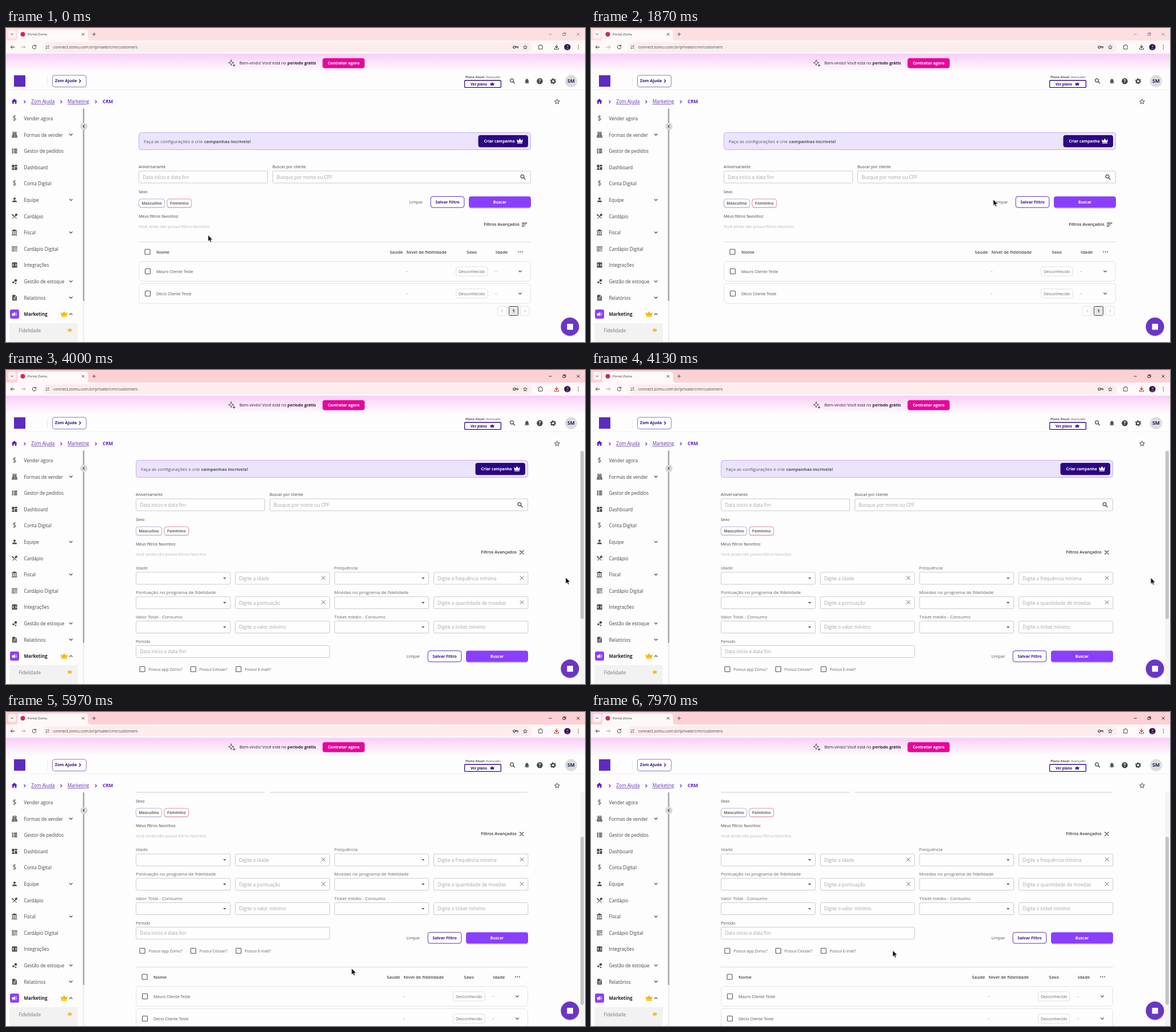
Write an HTML page that moves like this. It is 1017 by 551 pixels and loops after 8 s.

```html
<!DOCTYPE html>
<html lang="pt-BR">
<head>
<meta charset="utf-8">
<title>Portal Zomu</title>
<style>
html, body { margin: 0; width: 100%; height: 100%; overflow: hidden; background: #fdfdfd; }
svg { display: block; width: 1017px; height: 551px; }
text { font-family: "Open Sans", "Noto Sans", sans-serif; white-space: pre; }
.line { fill: none; stroke-linecap: round; stroke-linejoin: round; }

#strip, #wins, #save, #shut, #open, #hover, #arrow, #hand { animation: 8s step-end infinite; }
#strip { fill: #fddfe2; animation-name: strip; }
#wins { stroke: #8d8486; animation-name: wins; }
#save { stroke: #3c3c3c; animation-name: save; }
#shut { animation-name: shut; }
#open { visibility: hidden; animation-name: open; }
#hover { visibility: hidden; animation-name: hover; }
#arrow { animation-name: arrow; }
#hand { visibility: hidden; animation-name: hover; }
#page { animation: scroll 8s linear infinite; }
#thumb { animation: thumb 8s linear infinite; }
#cursor { animation: move 8s ease-in-out infinite; }

@keyframes strip { 38% { fill: #fcd1d6; } }
@keyframes wins { 38% { stroke: #222; } }
@keyframes save { 38% { stroke: #c5221f; } }
@keyframes shut { 0% { visibility: visible; } 38% { visibility: hidden; } }
@keyframes open { 0% { visibility: hidden; } 38% { visibility: visible; } }
@keyframes hover { 0% { visibility: hidden; } 30% { visibility: visible; } 38% { visibility: hidden; } }
@keyframes arrow { 0% { visibility: visible; } 30% { visibility: hidden; } 38% { visibility: visible; } }
@keyframes scroll {
  0%, 52.4% { transform: translateY(0); animation-timing-function: ease-in-out; }
  55.4%, 100% { transform: translateY(-106px); }
}
@keyframes thumb {
  0%, 52.4% { transform: translateY(0); animation-timing-function: ease-in-out; }
  55.4%, 100% { transform: translateY(77px); }
}
@keyframes move {
  0%, .4% { transform: translate(355px, 363.5px); }
  10%, 12.5% { transform: translate(340px, 249.5px); animation-timing-function: ease-in; }
  21% { transform: translate(590px, 276px); animation-timing-function: ease-out; }
  31%, 38.5% { transform: translate(911.5px, 344.5px); }
  48%, 51% { transform: translate(983px, 364px); }
  55%, 62.5% { transform: translate(985.5px, 376px); animation-timing-function: ease-in; }
  72.9% { transform: translate(655px, 428px); animation-timing-function: ease-out; }
  74.6%, 77% { transform: translate(607px, 450px); }
  90%, 100% { transform: translate(530px, 418.5px); }
}
</style>
</head>
<body>
<svg id="stage" viewBox="0 0 1017 551" xmlns="http://www.w3.org/2000/svg"></svg>
<script>
const text = (x, y, s, size = 7, fill = '#444', weight = 400, more = '') =>
  `<text x="${x}" y="${y}" font-size="${size}" fill="${fill}" font-weight="${weight}" ${more}>${s}</text>`;
const box = (x, y, w, h, fill = 'none', stroke = 'none', r = 2, more = '') =>
  `<rect x="${x}" y="${y}" width="${w}" height="${h}" rx="${r}" fill="${fill}" stroke="${stroke}" ${more}/>`;
const dot = (x, y, r, fill) => `<circle cx="${x}" cy="${y}" r="${r}" fill="${fill}"/>`;
const line = (d, stroke = '#444', w = 1) => `<path class="line" d="${d}" stroke="${stroke}" stroke-width="${w}"/>`;
// filled icon on a 24 unit grid, centred at x, y
const icon = (d, x, y, size, fill = '#4a4a4a') =>
  `<path fill-rule="evenodd" fill="${fill}" d="${d}" transform="translate(${x - size / 2} ${y - size / 2}) scale(${size / 24})"/>`;
const chevron = (x, y, dir, c = '#444', s = 2.4, w = 1.2) => line({
  down: `M${x - s} ${y - s / 2}l${s} ${s} ${s} ${-s}`,
  up: `M${x - s} ${y + s / 2}l${s} ${-s} ${s} ${s}`,
  right: `M${x - s / 2} ${y - s}l${s} ${s} ${-s} ${s}`,
  left: `M${x + s / 2} ${y - s}l${-s} ${s} ${s} ${s}`
}[dir], c, w);
const cross = (x, y, s, c = '#444', w = 1) =>
  line(`M${x - s} ${y - s}l${2 * s} ${2 * s}M${x + s} ${y - s}l${-2 * s} ${2 * s}`, c, w);

const paths = {
  list: 'M3 4h5v4H3zM10 4h11v4H10zM3 10h5v4H3zM10 10h11v4H10zM3 16h5v4H3zM10 16h11v4H10z',
  dash: 'M3 13h8V3H3v10zm0 8h8v-6H3v6zm10 0h8V11h-8v10zm0-18v6h8V3h-8z',
  person: 'M12 12c2.2 0 4-1.8 4-4s-1.8-4-4-4-4 1.8-4 4 1.8 4 4 4zm0 2c-2.7 0-8 1.3-8 4v2h16v-2c0-2.7-5.3-4-8-4z',
  till: 'M5 2h14v7H5zM7 4v2h10V4zM6 10h12l4 8H2zM8 12v1h8v-1zM7 15v1h10v-1zM2 19h20v3H2z',
  fork: 'M8.1 13.3l2.8-2.8L3.9 3.5c-1.6 1.6-1.6 4.1 0 5.7zm6.8-1.8c1.5.7 3.7.2 5.3-1.4 1.9-1.9 2.3-4.6.8-6.1-1.5-1.5-4.2-1.1-6.1.8-1.6 1.6-2.1 3.8-1.4 5.3L3.7 19.9l1.4 1.4L12 14.4l6.9 6.9 1.4-1.4L13.4 13z',
  bank: 'M4 10v7h3v-7zM10 10v7h3v-7zM2 22h19v-3H2zM16 10v7h3v-7zM11.5 1L2 6v2h19V6z',
  tiles: 'M3 3h8v8H3zM5 5v4h4V5zM13 3h8v8h-8zM15 5v4h4V5zM3 13h8v8H3zM5 15v4h4v-4zM13 13h3v3h-3zM18 13h3v3h-3zM13 18h3v3h-3zM18 18h3v3h-3z',
  code: 'M3 3h6l3-2 3 2h6v18H3zM10 8.5L8.5 7 4.5 12l4 5 1.5-1.500L7.200 12zM14 8.500L15.500 7l4 5-4 5-1.500-1.500 2.800-3.500z',
  doc: 'M6 2h8l6 6v14H4V4zM7 11v2h10v-2zM7 16v2h10v-2zM13 4v5h5z',
  horn: 'M2 9h5l7-5v16l-7-5H7v5H4v-5H2zM16 8c3 1 3 7 0 8zM18 11h4v2h-4zM17 7l3-3 1 1-3 3zM17 17l3 3 1-1-3-3z',
  crown: 'M1 6l6 5 5-8 5 8 6-5-2 11H3zM3 18.500h18V21H3z',
  bell: 'M12 22c1.100 0 2-.9 2-2h-4c0 1.100.9 2 2 2zM18 16v-5c0-3-1.600-5.600-4.500-6.300V4c0-2-3-2-3 0v.7C7.600 5.400 6 8 6 11v5l-2 2v1h16v-1z',
  home: 'M10 20v-6h4v6h5v-8h3L12 3 2 12h3v8z',
  star: 'M12 2l3 7 7.500.7-5.700 5 1.700 7.300L12 18l-6.500 4 1.700-7.300-5.700-5L9 9zM12 6l-1.800 4.300-4.600.4 3.500 3-1 4.600 3.900-2.400 3.900 2.400-1-4.600 3.500-3-4.600-.4z'
};
const glass = (x, y, c = '#444') =>
  `<circle cx="${x - 1}" cy="${y - 1}" r="2.900" fill="none" stroke="${c}" stroke-width="1.200"/>` +
  line(`M${x + 1.300} ${y + 1.300}l2.700 2.700`, c, 1.300);

function browser() {
  return `<rect id="strip" width="1017" height="24"/>` +
    box(4, 3.5, 13.5, 14, '#fff1f2', 'none', 4) + chevron(10.7, 11, 'down', '#333', 1.8, 1) +
    `<path fill="#fff8f8" d="M16 22q4 0 4-4V8q0-5 5-5h114q5 0 5 5v10q0 4 4 4h869v23H0V22z"/>` +
    dot(29.5, 11, 4, '#d1265c') + text(38, 13.2, 'Portal Zomu', 6, '#333') +
    cross(135.5, 11, 1.9, '#333', .9) + line('M152 11h5.400M154.700 8.300v5.400', '#444', .9) +
    `<g id="wins" fill="none" stroke-width=".9"><path d="M953.500 11h5M978 9.500h3.800v3.800H978zM979.300 9.500V8.300h3.800v3.800h-1.300M1002.500 8.500l5 5M1007.500 8.500l-5 5"/></g>` +
    line('M15 33.500H8.500M11 30.700l-2.800 2.800 2.800 2.800', '#333') +
    line('M27 33.500h6.500M31 30.700l2.800 2.800-2.800 2.800', '#aaa') +
    line('M52.300 31.400a3.300 3.300 0 1 0 .6 2.800M52.600 30v2h-2', '#333') +
    box(65, 25.3, 859, 16.7, '#fcecec', 'none', 8.3) +
    dot(72.500, 33.500, 5.800, '#fff8f8') +
    line('M69.800 31.700h2.200M73.700 35.300h2.200', '#444', .9) +
    `<circle cx="74.500" cy="31.700" r="1.100" fill="none" stroke="#444" stroke-width=".8"/><circle cx="71" cy="35.300" r="1.100" fill="none" stroke="#444" stroke-width=".8"/>` +
    text(83, 36, 'connect.zomu.com.br/private/crm/customers', 7, '#4a4547') +
    `<circle cx="892.800" cy="33.500" r="2" fill="none" stroke="#444" stroke-width="1.200"/>` +
    line('M895 32.500h4.500v2.500h-2v-1.500h-2', '#444', .9) +
    icon(paths.star, 912, 33.5, 9.500, '#333') +
    line('M935.500 31h2q0-2 1.500-2t1.500 2h1.500v2.500q1.500.500 0 2V37h-6.500v-2q1.500-.7 0-2z', '#444') +
    `<path id="save" class="line" stroke-width="1.100" d="M967 29.500v5M964.700 32.500l2.300 2.300 2.300-2.300M963.500 35.500v1.800h7v-1.800"/>` +
    dot(986, 33.5, 5.600, '#2c1650') + dot(986.5, 32, 1.700, '#9b5a86') +
    `<path fill="#6b3a78" d="M983.500 38q.3-3.500 2.800-3.500t2.700 3.500z"/>` +
    [30.5, 33.5, 36.5].map(y => dot(1005.3, y, .8, '#333')).join('');
}

function header() {
  return `<rect y="45" width="1017" height="32" fill="url(#glow)"/>` +
    line('M395.500 56q.4 4.600 4.700 5-4.300.4-4.700 5-.4-4.600-4.700-5 4.300-.4 4.700-5zM400.500 63.500v4M398.500 65.500h4', '#333', .9) +
    text(410, 64.2, 'Bem-vindo! Você está no <tspan font-weight="700">período grátis</tspan>', 7.2, '#22202e') +
    box(556, 53, 74, 17.5, '#e8059c', 'none', 4) + text(593, 64.3, 'Contratar agora', 7, '#fff', 700, 'text-anchor="middle"') +
    box(14, 83, 20, 20, '#5c2bc0', 'none', 0) +
    line('M72.500 86v16', '#ddd', .7) +
    box(81.5, 83, 59.5, 20.5, '#fff', '#8b76c8', 4) + text(86, 95.3, 'Zom Ajuda', 7.2, '#2c0f86', 700) +
    chevron(130, 93, 'right', '#2c0f86', 2.3, 1.3) +
    text(807, 88.2, '<tspan font-weight="700">Plano Atual:</tspan> Avançado', 5.7, '#555') +
    box(805.6, 92, 63.8, 12.3, '#fff', '#2c0a8a', 1, 'stroke-width="1.300"') + text(816, 100.5, 'Ver plano', 6.1, '#2c0a8a', 700) +
    icon(paths.crown, 854, 98, 8, '#2c0a8a') +
    glass(889.5, 93) + icon(paths.bell, 915, 93.2, 11.5, '#555') +
    dot(937.500, 93.300, 5.200, '#444') + text(937.5, 96.3, '?', 8.5, '#fff', 700, 'text-anchor="middle"') +
    `<circle cx="961" cy="93.300" r="2.900" fill="none" stroke="#444" stroke-width="2"/><circle cx="961" cy="93.300" r="4.400" fill="none" stroke="#444" stroke-width="1.500" stroke-dasharray="2.300"/>` +
    dot(992.5, 93.3, 10.7, '#dcdcdf') + text(992.5, 96.4, 'SM', 8.7, '#221c4a', 700, 'text-anchor="middle"') +
    line('M0 108.500h1017', '#ececec', .8) +
    icon(paths.home, 14.7, 128.8, 12.5, '#5c1fc4') +
    [33, 97, 158].map(x => chevron(x, 129.5, 'right', '#5c1fc4', 2.2, 1.2)).join('') +
    text(44.3, 132.4, 'Zom Ajuda', 8.2, '#5a2fb0', 400, 'text-decoration="underline"') +
    text(108, 132.4, 'Marketing', 8.1, '#5a2fb0', 400, 'text-decoration="underline"') +
    text(169.8, 132.4, 'CRM', 8.1, '#5a1fc0', 700) +
    icon(paths.star, 968, 128.8, 12, '#444');
}

function sidebar() {
  const items = [
    ['$', 'Vender agora'], ['till', 'Formas de vender', 1], ['list', 'Gestor de pedidos'],
    ['dash', 'Dashboard'], ['$', 'Conta Digital'], ['person', 'Equipe', 1], ['fork', 'Cardápio'],
    ['bank', 'Fiscal', 1], ['tiles', 'Cardápio Digital'], ['code', 'Integrações'],
    ['dots', 'Gestão de estoque', 1], ['doc', 'Relatórios', 1]
  ];
  const rows = items.map(([kind, label, more], i) => {
    const y = 159 + i * 28.6;
    const mark = kind === '$' ? text(15, y + 3.8, '$', 12, '#4a4a4a', 400, 'text-anchor="middle"')
      : kind === 'dots' ? dot(13, y + 1.3, 1.8, '#4a4a4a') + dot(17, y - 2, 2.3, '#4a4a4a') + dot(17, y + 3, 1.3, '#4a4a4a')
      : icon(paths[kind], 15, y - .4, 12);
    return mark + text(31.5, y + 3, label, 8.15, '#444') + (more ? chevron(114, y - .4, 'down') : '');
  });
  return rows.join('') +
    box(7, 494, 16, 16, '#8a3ffc', 'none', 3) + icon(paths.horn, 15, 502, 11, '#fff') +
    text(31.5, 505.3, 'Marketing', 8, '#222', 700) +
    icon(paths.crown, 102, 501.8, 13, '#f5b400') + chevron(114, 502, 'up') +
    box(6, 518, 120, 40, '#f2f2f2', 'none', 0) + text(22.5, 533.5, 'Fidelidade', 8.1, '#777') +
    icon(paths.crown, 112, 529.5, 8.5, '#f5b400') +
    box(135, 141, 2.6, 410, '#eeeeee', 'none', 1) + box(135, 141, 2.6, 338, '#a9a9a9', 'none', 1) +
    dot(136.8, 172.7, 6.4, '#d9d9d9') + chevron(136.5, 172.7, 'left', '#333', 2.2, 1.1);
}

const edge = '#c6c5c0', hint = '#a5a5a8';
const field = (x, y, w, s = '') => box(x + .5, y, w, 21, '#fefefe', edge, 2, 'stroke-width=".9"') + text(x + 7.2, y + 13.8, s, 8.25, hint);
const check = (x, y) => box(x, y, 9, 9, 'none', '#555', 1, 'stroke-width="1.100"');
const chip = (x, w, s, c) => box(x, 301, w, 15, '#ddd', 'none', 4) +
  box(x + .3, 300, w - .6, 14.8, '#fefefe', c, 4) + text(x + w / 2, 310, s, 7, '#666', 700, 'text-anchor="middle"');

function actions() {
  return text(708.3, 308, 'Limpar', 7.3, '#555', 500) +
    box(746, 295.7, 58.8, 19.3, '#fff', '#5b2fb5', 4) + text(775.5, 307.9, 'Salvar Filtro', 7.1, '#3c148f', 700, 'text-anchor="middle"') +
    box(813.5, 297, 108, 20, '#d5c9ea', 'none', 4) + box(813, 295.5, 109, 19.7, '#8a3ffc', 'none', 4) +
    text(867.5, 307.9, 'Buscar', 6.9, '#fff', 700, 'text-anchor="middle"');
}

function table() {
  const row = (y, name) => box(233.5, y - 17.3, 688, 34.5, '#fdfdfd', '#dfdee8', 5, 'stroke-width=".9"') +
    check(244.5, y - 4.5) + text(264, y + 2.6, name, 7, '#555') + text(702.8, y + 2.4, '-', 7) + text(859.5, y + 2.4, '-', 7) +
    box(790.5, y - 8, 55.5, 16, '#fff', '#dcdcdc', 3, 'stroke-width=".9"') +
    text(818.3, y + 2.6, 'Desconhecido', 7.1, '#666', 400, 'text-anchor="middle"') + chevron(903, y, 'down');
  const heads = [[264, 'Nome'], [674, 'Saúde'], [703.3, 'Nível de fidelidade'], [809.3, 'Sexo'], [860, 'Idade']];
  return line('M233 375.500h688.500', '#d9d7e2', .9) + check(244, 388.2) +
    heads.map(([x, s]) => text(x, 396, s, 7.9, '#444', 600)).join('') +
    [900, 903.5, 907].map(x => dot(x, 392.8, .95, '#444')).join('') +
    row(427, 'Mauro Cliente Teste') + row(466, 'Décio Cliente Teste') +
    box(863.500, 488.500, 15.500, 16, '#fff', '#e0e0e0', 2) + chevron(871.300, 496.500, 'left', '#999', 2, .9) +
    box(883.500, 488.500, 16, 16, '#e6e6e8', '#444', 2) + text(891.500, 499, '1', 7.200, '#222', 700, 'text-anchor="middle"') +
    box(903.500, 488.500, 15.500, 16, '#fff', '#e0e0e0', 2) + chevron(911.700, 496.500, 'right', '#999', 2, .9);
}

function filters() {
  return box(233.5, 183.5, 688, 30, '#ece3fd', '#bfa9ea', 4, 'stroke-width=".9"') +
    text(242, 201.6, 'Faça as configurações e crie <tspan font-weight="700" font-size="7.850">campanhas incríveis!</tspan>', 8, '#555') +
    box(829.5, 188, 87.5, 21.2, '#2b0782', 'none', 4) + text(839.5, 201, 'Criar campanha', 6.8, '#fff', 700) +
    icon(paths.crown, 902.5, 198.3, 12, '#fff') +
    text(233, 246.300, 'Aniversariante') + field(233, 251, 226, 'Data início e data fim') +
    text(468, 246.300, 'Buscar por cliente') + field(468, 251, 453, 'Busque por nome ou CPF') + glass(908, 261.5) +
    text(233, 289.800, 'Sexo') + chip(233, 46, 'Masculino', '#b3b2dc') + chip(282.700, 43.500, 'Feminino', '#dd8fb0') +
    text(233, 332.500, 'Meus filtros favoritos:') +
    text(233, 351.300, 'Você ainda não possui filtros favoritos', 7, '#b9b9bc');
}
const advanced = text(839.3, 347.4, 'Filtros Avançados', 7.4, '#333', 600);

function extra() {
  const rows = [
    ['Idade', 'Digite a idade', 'Frequência', 'Digite a frequência mínima'],
    ['Pontuação no programa de fidelidade', 'Digite a pontuação', 'Moedas no programa de fidelidade', 'Digite a quantidade de moedas'],
    ['Valor Total - Consumo', 'Digite o valor mínimo', 'Ticket médio - Consumo', 'Digite o ticket mínimo']
  ];
  const pair = (x, y, label, s, clear) => text(x, y - 4.7, label, 8, '#666') + field(x, y, 165.5) +
    `<path fill="#555" d="M${x + 153.300} ${y + 9.300}h5.400l-2.700 2.800z"/>` +
    field(x + 174.3, y, 165.5, s) + (clear ? cross(x + 329.5, y + 9.800, 3, '#555', .9) : '');
  const checks = [[240, 'Possui app Zomu?'], [329.5, 'Possui Celular?'], [409, 'Possui E-mail?']];
  return rows.map((r, i) => {
    const y = 380 + i * 42.8;
    return pair(233, y, r[0], r[1], i < 2) + pair(581.6, y, r[2], r[3], i < 2);
  }).join('') +
    text(233, 503.600, 'Período', 7, '#555') + field(233, 508.500, 340, 'Data início e data fim') +
    checks.map(([x, s]) => check(x, 545.5) + text(x + 15.3, 552.6, s, 7, '#666')).join('') +
    cross(910.8, 345, 3.2, '#333', 1.2);
}

function cursor() {
  return `<g id="cursor">
    <path id="arrow" fill="#111" stroke="#fff" stroke-width=".6" d="M0 0v11l2.500-2.300 1.700 3.900 1.900-.8-1.700-3.800H8z"/>
    <path id="hand" fill="#fff" stroke="#222" stroke-width=".8" stroke-linejoin="round" d="M-.9 6.800V.8q.9-1.300 1.800 0v3.700q1-.8 1.800.2 1-.6 1.700.4 1.400-.3 1.600 1v3q-.2 1.400-1 2.400H.4L-3 7.300q.4-1.700 2.100-.5z"/>
  </g>`;
}

document.getElementById('stage').innerHTML = `
  <defs>
    <linearGradient id="glow" x2="0" y2="1">
      <stop offset="0" stop-color="#facdf8"/><stop offset=".5" stop-color="#fce6fb"/><stop offset="1" stop-color="#fdfdfd"/>
    </linearGradient>
    <clipPath id="view"><rect x="139" y="140" width="878" height="411"/></clipPath>
  </defs>
  <rect width="1017" height="551" fill="#fdfdfd"/>
  ${header()}${browser()}${sidebar()}
  <g clip-path="url(#view)">
    <g id="shut">${filters()}${actions()}
      ${box(835, 335, 86.5, 19.5, '#f4f3f7', 'none', 3, 'id="hover"')}
      ${advanced}${line('M906.500 342.300h8.500M906.500 345h6M906.500 347.700h3.500', '#333', 1.200)}
      ${table()}
    </g>
    <g id="open">
      <g id="page"><g transform="translate(-5 -25)">
        ${filters()}${advanced}${extra()}
        <g transform="translate(0 222)">${actions()}</g>
        <g transform="translate(0 203)">${table()}</g>
      </g></g>
      ${box(1008.500, 141, 7.500, 410, '#f3f3f3', 'none', 0)}
      ${box(1009, 142, 6, 295, '#c4c4c4', 'none', 3, 'id="thumb"')}
    </g>
  </g>
  ${dot(990.800, 525.500, 16.300, '#dcd6ea')}${dot(990.500, 524, 16, '#6936c6')}${box(985.500, 519, 10.500, 10.500, '#fff', 'none', 1)}
  ${cursor()}`;
</script>
</body>
</html>
```
